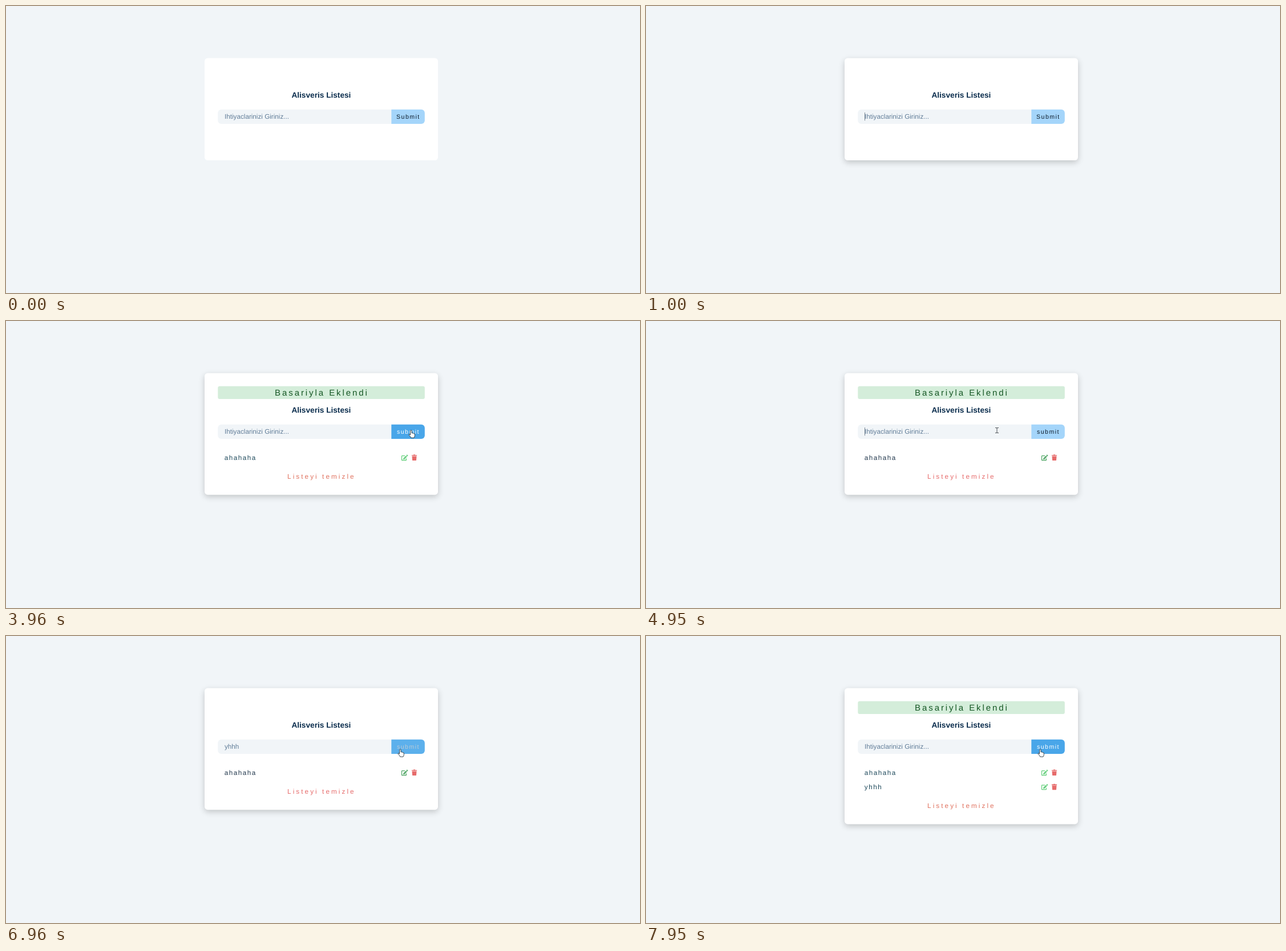
An HTML page with a canvas for the animation above (8 s loop, 1111x504 px).

```html
<!DOCTYPE html>
<html lang="tr">
<head>
<meta charset="utf-8">
<title>Alisveris Listesi</title>
<style>
html, body { margin: 0; width: 100%; height: 100%; overflow: hidden; background: #f1f5f8; }
canvas { display: block; }
</style>
</head>
<body>
<canvas id="stage" width="1111" height="504"></canvas>
<script>
const ctx = document.getElementById('stage').getContext('2d');
const LOOP = 8000;
const PLACEHOLDER = 'Ihtiyaclarinizi Giriniz...';
const FONT = 'Arial, "Liberation Sans", sans-serif';
const BASE = 11.69;

const IDLE = ['#a4d5fa', '#0d1c2b'];
const HOVER = ['#49a6e9', '#ffffff'];
const LEAVING = ['#5cb0ec', '#bccbd6'];
const FRESH = { text: '#1f4a5c', edit: '#68d07f', clear: '#e0725f' };
const SETTLED = { text: '#22384d', edit: '#55a96a', clear: '#e66b6b' };

// Each step overrides the properties of the one before it.
const steps = [
  { at: 0, value: '', caret: null, label: 'Submit', button: IDLE, items: [], alert: false, shadow: false, pointer: null, tone: FRESH },
  { at: 1000, shadow: true, caret: 383.5 },
  { at: 1950, value: 'a', caret: 389.5 },
  { at: 2970, value: 'ahahaha', caret: null, pointer: [drawBeam, 578, 206] },
  { at: 3960, value: '', label: 'submit', button: HOVER, items: ['ahahaha'], alert: true, pointer: [drawHand, 711, 198.5] },
  { at: 4950, caret: 383.5, button: IDLE, tone: SETTLED, pointer: [drawBeam, 615, 192] },
  { at: 5950, value: 'yhhh', caret: 408.5, alert: false, pointer: null },
  { at: 6960, caret: null, button: LEAVING, pointer: [drawHand, 692, 205.5] },
  { at: 7950, value: '', button: HOVER, items: ['ahahaha', 'yhhh'], alert: true, tone: FRESH }
];

function stateAt(time) {
  return Object.assign({}, ...steps.filter(step => step.at <= time));
}

function box(x, y, w, h, radius, color) {
  ctx.fillStyle = color;
  ctx.beginPath();
  ctx.roundRect(x, y, w, h, radius);
  ctx.fill();
}

function text(str, x, y, color, size = BASE, spacing = 0, weight = 400) {
  ctx.font = `${weight} ${size}px ${FONT}`;
  ctx.letterSpacing = spacing + 'px';
  ctx.textRendering = 'geometricPrecision';
  ctx.fillStyle = color;
  ctx.fillText(str, x, y);
}

function at(x, y, draw) {
  ctx.save();
  ctx.translate(x, y);
  draw();
  ctx.restore();
}

function drawBeam() {
  ctx.strokeStyle = '#4a4f54';
  ctx.lineWidth = 1;
  ctx.stroke(new Path2D('M-3 -4.5H-1L0 -4L1 -4.5H3M0 -4V4M-3 4.5H-1L0 4L1 4.5H3'));
}

function drawHand() {
  const hand = new Path2D('M-2.4 -6Q-1.2 -7.6 0 -6V-1.7Q1 -2.6 1.8 -1.3Q2.8 -2 3.6 -.7Q5.2 -1.2 5.3 .6V3Q5.2 4.5 4 6.6H-1.2Q-2 4.6 -4.8 1.8Q-5.6 .4 -4 .2L-2.4 1.6Z');
  ctx.fillStyle = '#ffffff';
  ctx.strokeStyle = '#25313c';
  ctx.lineWidth = 0.9;
  ctx.lineJoin = 'round';
  ctx.fill(hand);
  ctx.stroke(hand);
}

function drawEdit(color) {
  ctx.strokeStyle = ctx.fillStyle = color;
  ctx.lineWidth = 1.3;
  ctx.lineJoin = 'round';
  ctx.stroke(new Path2D('M6.2 2H1.3Q.7 2 .7 2.6V9.2Q.7 9.8 1.3 9.8H8Q8.6 9.8 8.6 9.2V6.5'));
  ctx.fill(new Path2D('M8.1 1.7L10 3.6L5.5 8.1L3.2 8.4L3.5 6.2ZM8.6 1.2L9.4 .4Q10 -.1 10.6 .4L11.3 1.1Q11.8 1.7 11.3 2.3L10.5 3.1Z'));
}

function drawTrash() {
  ctx.fillStyle = '#e66b6b';
  ctx.fill(new Path2D('M0 .8H2.7L3.2 0H6L6.5 .8H9.2V2.1H0ZM.6 2.8H8.6L8.1 9.6Q8 10.5 7.2 10.5H2Q1.2 10.5 1.1 9.6Z'));
}

function drawCard(state) {
  const count = state.items.length;
  const height = count ? 188.6 + 25.2 * count : 179.7;
  ctx.save();
  if (state.shadow) {
    ctx.shadowColor = 'rgba(0,0,0,.2)';
    ctx.shadowBlur = 11;
    ctx.shadowOffsetY = 3.65;
  }
  box(348, 91.4, 409, height, 5.5, '#ffffff');
  ctx.restore();
}

function drawForm(state) {
  const [fill, ink] = state.button;
  text('Alisveris Listesi', 500.4, 161, '#0a2d4d', 13.67, 0, 700);
  box(371.3, 181.8, 304, 25.3, [6, 0, 0, 6], '#f1f5f8');
  text(state.value || PLACEHOLDER, 383, 198.3, '#617d98');
  if (state.caret) box(state.caret - 0.4, 187, 0.8, 14.2, 0, '#5c6b7a');
  box(675.3, 181.8, 58.5, 25.3, [0, 6, 6, 0], fill);
  text(state.label, state.label === 'Submit' ? 684 : 685, 197.9, ink, 10.6, 1.46);
}

function drawList(state) {
  const { items, tone } = state;
  items.forEach((item, i) => {
    const y = 25.2 * i;
    text(item, 382.8, 244 + y, tone.text, BASE, 1.5);
    at(692.8, 234.7 + y, () => drawEdit(tone.edit));
    at(710.9, 234.6 + y, drawTrash);
  });
  if (items.length) text('Listeyi temizle', 493.1, 251.4 + 25.2 * items.length, tone.clear, BASE, 3.08);
}

function render(time) {
  const state = stateAt(time);
  ctx.fillStyle = '#f1f5f8';
  ctx.fillRect(0, 0, 1111, 504);
  drawCard(state);
  if (state.alert) {
    box(371.3, 114.4, 362.5, 22.6, 3, '#d4edda');
    text('Basariyla Eklendi', 471, 130.6, '#155724', 15, 2.93);
  }
  drawForm(state);
  drawList(state);
  if (state.pointer) {
    const [draw, x, y] = state.pointer;
    at(x, y, draw);
  }
}

const start = performance.now();
function tick() {
  render((performance.now() - start) % LOOP);
  requestAnimationFrame(tick);
}
tick();
</script>
</body>
</html>
```
